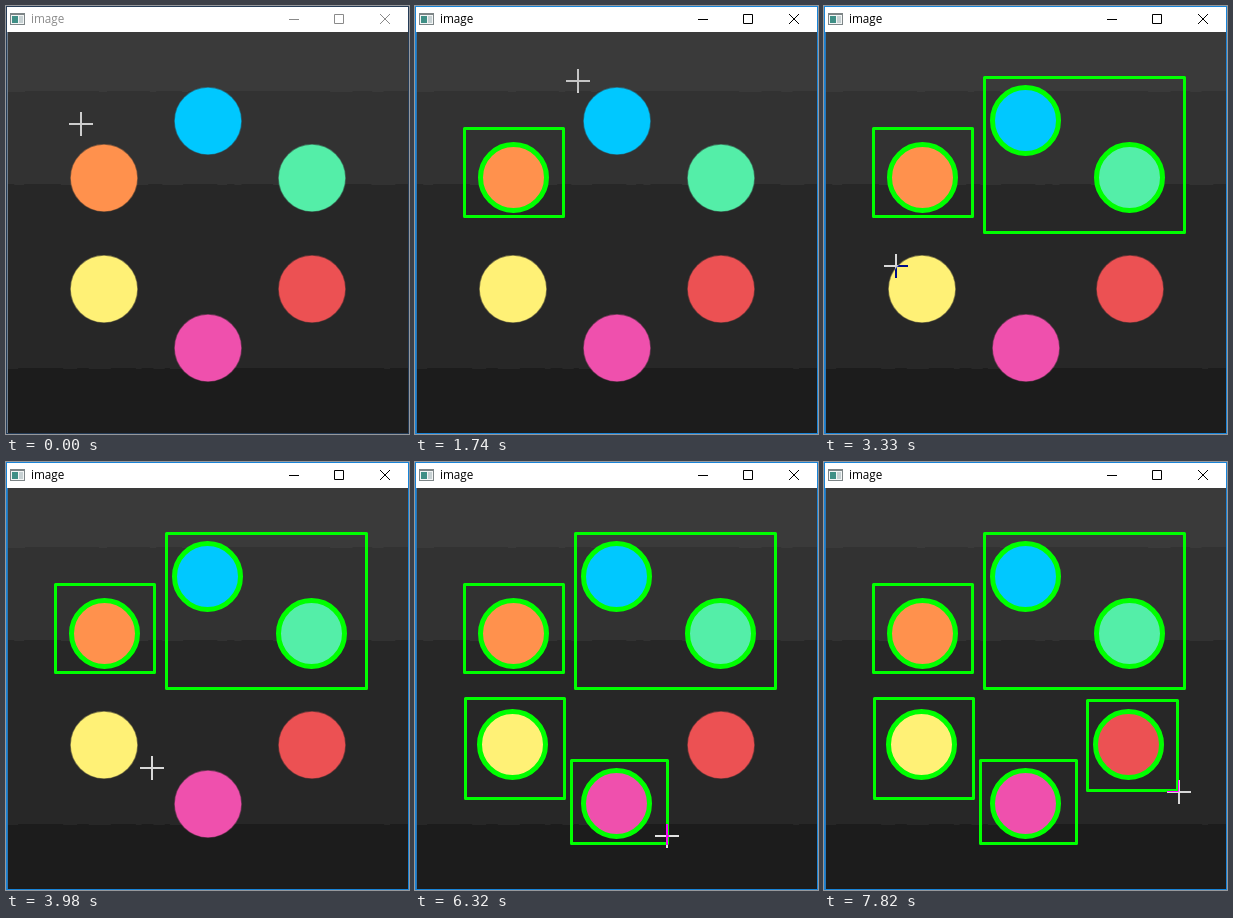
These frames come from a looping animation (403 px wide and 428 px high, 7.87 s). An HTML page:

```html
<!DOCTYPE html>
<html lang="en">
<head>
<meta charset="utf-8">
<title>image</title>
<style>
  html, body { margin: 0; width: 100%; height: 100%; overflow: hidden; background: #fff; }
  svg { display: block; width: 403px; height: 428px; isolation: isolate; --ink: #8a8a8a; --edge: #253c57; --seam: #6f7f90; }
  svg.active { --ink: #000; --edge: #1883d7; --seam: #2a76b5; }
  .title { font: 11.7px "Open Sans", "Noto Sans", sans-serif; fill: var(--ink); }
  .buttons { fill: none; stroke: var(--ink); }
  .edge { fill: none; stroke: var(--edge); }
  .seam { fill: var(--seam); }
  .mark { fill: none; stroke: #0f0; stroke-linejoin: round; visibility: hidden; }
  #cursor { fill: #fff; mix-blend-mode: difference; }
</style>
</head>
<body>
<svg id="stage" viewBox="0 0 403 428">
  <rect width="403" height="428" fill="#fff"/>
  <g shape-rendering="crispEdges">
    <rect x="4" y="7" width="15" height="12" fill="#7d8587"/>
    <rect x="5" y="9" width="13" height="9" fill="#f2f5f5"/>
    <rect x="6" y="10" width="6" height="7" fill="#3f8f86"/>
    <rect x="13" y="10" width="4" height="7" fill="#c7d1d3"/>
  </g>
  <text class="title" x="25" y="17">image</text>
  <path class="buttons" d="M283 13.5h10M328.5 8.5h9v9h-9zM374 8l10 10M384 8l-10 10"/>
  <g id="bands"></g>
  <rect class="seam" x="1" y="26" width="1" height="401"/>
  <g id="discs"></g>
  <g id="marks"></g>
  <rect class="edge" x=".5" y=".5" width="402" height="427"/>
  <path id="cursor" d="M-12-1H-1V-12H1V-1H12V1H1V12H-1V1H-12z"/>
</svg>
<script>
const LOOP = 7870, ACTIVATE = 290;
const $ = id => document.getElementById(id);
const stage = $('stage'), cursor = $('cursor');

function add(parent, tag, attrs) {
  const node = document.createElementNS('http://www.w3.org/2000/svg', tag);
  for (const key in attrs) node.setAttribute(key, attrs[key]);
  return parent.appendChild(node);
}

// Background bands with slightly ragged upper edges
let seed = 7;
const random = () => (seed = seed * 16807 % 2147483647) / 2147483647;
function addBand(top, fill, ragged = true) {
  let d = `M2 427V${top}`;
  for (let x = 2; ragged && x < 394; x += 4 + random() * 8) {
    d += `H${x.toFixed(1)}V${top + (random() < .3 ? 1 : 0)}`;
  }
  add($('bands'), 'path', { d: `${d}H402V427z`, fill });
}
addBand(26, '#3a3a3a', false);
addBand(85, '#323232');
addBand(178, '#272727');
addBand(362, '#1c1c1c');

function addDisc(cx, cy, fill, ringShift = -.5) {
  add($('discs'), 'circle', { cx, cy, r: 33.2, fill, stroke: fill, 'stroke-opacity': .4, 'stroke-width': 1.4 });
  return { cx: cx + ringShift, cy: cy - .5 };
}
const blue = addDisc(202, 115, '#00c8ff');
const orange = addDisc(98, 172, '#ff914d', .5);
const green = addDisc(306, 172, '#54eea8');
const yellow = addDisc(98, 283, '#fff176');
const red = addDisc(306, 283, '#ec5153', -1.5);
const pink = addDisc(202, 342, '#ef50ad');

// A selection and its rings appear when the drag is released
function addSelection(time, [left, top], [right, bottom], ...rings) {
  const group = add($('marks'), 'g', { class: 'mark' });
  add(group, 'rect', {
    x: left + .5, y: top + .5, width: right - left, height: bottom - top, 'stroke-width': 3
  });
  for (const ring of rings) add(group, 'circle', { ...ring, r: 33, 'stroke-width': 5 });
  return { time, group };
}
const selections = [
  addSelection(1130, [49, 122], [148, 210], orange),
  addSelection(2790, [160, 71], [360, 226], blue, green),
  addSelection(4820, [50, 236], [149, 336], yellow),
  addSelection(6320, [156, 298], [252, 381], pink),
  addSelection(7650, [263, 238], [353, 328], red)
];

// Pointer stops: arrival time, x, y and, where it rests, the time it leaves again
const path = [];
const move = (...stops) => path.push(...stops);
move([0, 75, 118], [150, 61, 112], [250, 49, 122, 320], [820, 145, 207, 840], [930, 148, 210, 1130]);
move([1310, 178, 160], [1400, 171, 105], [1490, 160, 71, 1710], [1740, 163, 75], [2400, 360, 226, 2760]);
move([2790, 354, 227], [2900, 300, 214], [3080, 220, 245], [3260, 100, 268], [3400, 45, 252], [3530, 50, 236, 3590]);
move([3980, 146, 306], [4100, 147, 312, 4260], [4620, 149, 326, 4790]);
move([4820, 149, 336], [5050, 174, 311], [5120, 170, 307], [5270, 165, 304, 5400]);
move([5470, 156, 298, 5600], [6170, 252, 381, 6290]);
move([6320, 252, 375], [6550, 282, 250], [6640, 274, 228], [6770, 262, 238, 6950]);
move([7370, 353, 328, 7630], [7820, 355, 330, LOOP]);

function pointerAt(time) {
  const next = path.findIndex(stop => stop[0] > time);
  if (next < 0) return path[path.length - 1].slice(1, 3);
  const [t0, x0, y0, leave = t0] = path[next - 1];
  const [t1, x1, y1, rests] = path[next];
  let p = Math.max(0, (time - leave) / (t1 - leave));
  if (rests) p = p * p * (3 - 2 * p);
  return [Math.round(x0 + (x1 - x0) * p), Math.round(y0 + (y1 - y0) * p)];
}

const start = performance.now();
function draw() {
  const time = (performance.now() - start) % LOOP;
  stage.classList.toggle('active', time >= ACTIVATE);
  for (const s of selections) s.group.style.visibility = time >= s.time ? 'visible' : 'hidden';
  cursor.setAttribute('transform', `translate(${pointerAt(time)})`);
  requestAnimationFrame(draw);
}
draw();
</script>
</body>
</html>
```
